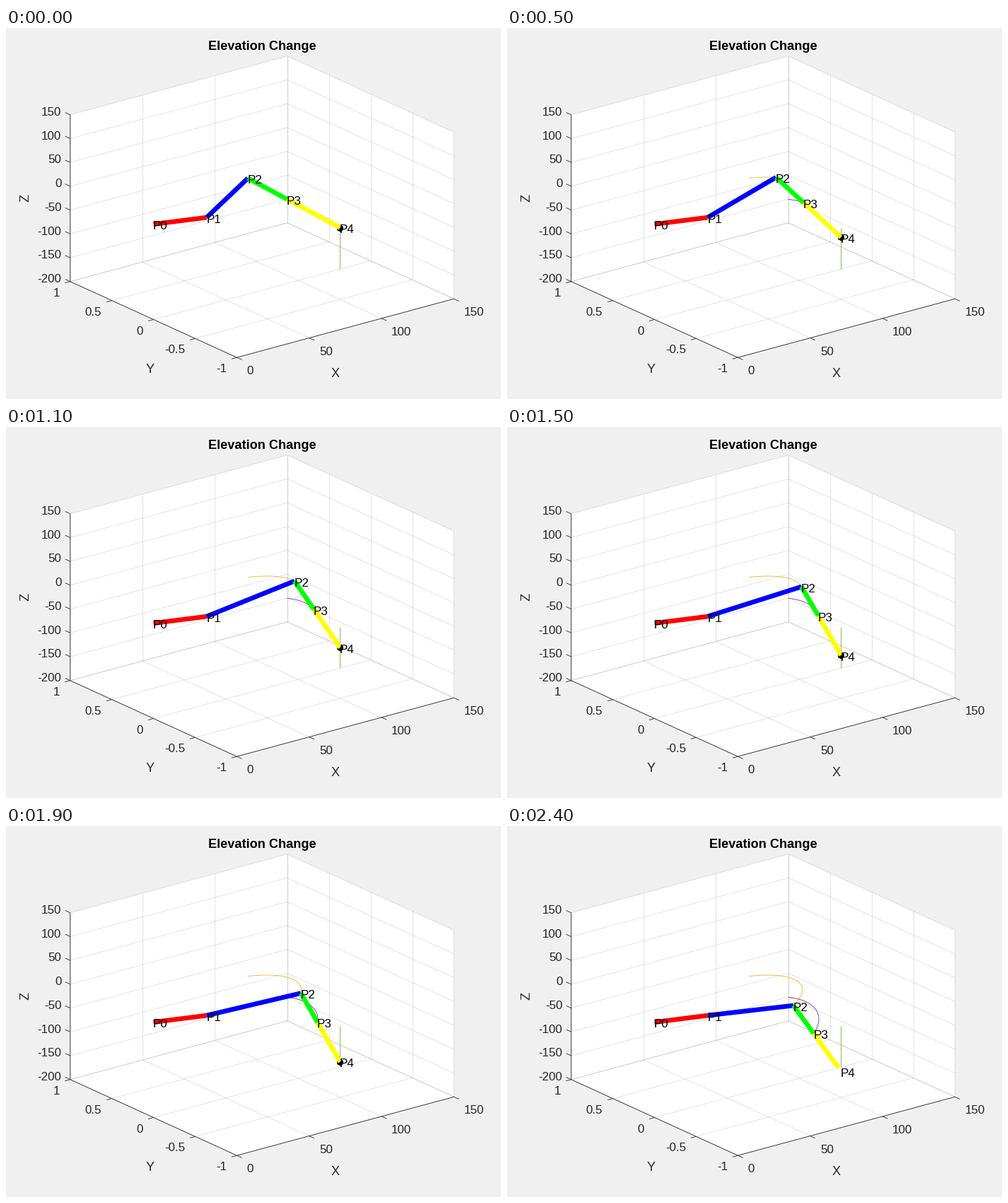
Recreate the animation shown at these times as a matplotlib script. Size 700 px wide and 525 px high, loop 2.5 s.

```python
import numpy as np
import matplotlib.pyplot as plt
from matplotlib.animation import FuncAnimation

W, H, DPI = 700, 525, 100
PX = 72 / DPI          # points per pixel
FRAMES, STEP_MS = 25, 100
INK = "#262626"
THIN = 0.83 * PX
BIG, SMALL = 18.2, 17  # text sizes in pixels

plt.rcParams["font.family"] = "Liberation Sans"
plt.rcParams["axes.unicode_minus"] = False

# Parallel projection of the 3D box, in pixels
ORIGIN = np.array([208.6, 277.65])
EX = np.array([307, -83]) / 150
EY = np.array([-235.7, -107.5]) / 2
EZ = np.array([0, -236 / 350])
FLOOR, TOP = -200, 150


def project(x, y, z):
    return ORIGIN + x * EX + y * EY + z * EZ


fig = plt.figure(figsize=(W / DPI, H / DPI), dpi=DPI, facecolor="#f0f0f0")
ax = fig.add_axes([0, 0, 1, 1])
ax.set_xlim(0, W)
ax.set_ylim(H, 0)
ax.axis("off")


def stroke(*points, color=INK, width=THIN, **kw):
    xs, ys = np.array(points).T
    return ax.plot(xs, ys, color=color, lw=width, solid_capstyle="butt", **kw)[0]


def label(x, y, text, size=SMALL, color=INK, **kw):
    return ax.text(x, y, text, fontsize=size * PX, color=color, va="baseline", **kw)


def grid(*points):
    stroke(*points, alpha=0.15, zorder=1)


def tick(p, direction):
    stroke(p, p + 7.8 * direction / np.hypot(*direction), zorder=2)


# Box faces
hull = [project(*c) for c in [(0, 1, TOP), (150, 1, TOP), (150, -1, TOP),
                              (150, -1, FLOOR), (0, -1, FLOOR), (0, 1, FLOOR)]]
ax.fill(*np.array(hull).T, color="white", lw=0, zorder=0)

# Grid, ticks and tick labels
for x in (0, 50, 100, 150):
    grid(project(x, -1, FLOOR), project(x, 1, FLOOR))
    grid(project(x, 1, FLOOR), project(x, 1, TOP))
    p = project(x, -1, FLOOR)
    tick(p, -EY)
    label(p[0] + 14, p[1] + 24.2, str(x))

for y in (-1, -0.5, 0, 0.5, 1):
    grid(project(0, y, FLOOR), project(150, y, FLOOR))
    grid(project(150, y, FLOOR), project(150, y, TOP))
    p = project(0, y, FLOOR)
    tick(p, -EX)
    label(p[0] - 14.4, p[1] + 21, f"{y:g}", ha="right")

for z in range(FLOOR, TOP + 1, 50):
    grid(project(0, 1, z), project(150, 1, z))
    grid(project(150, 1, z), project(150, -1, z))
    p = project(0, 1, z)
    tick(p, EY)
    label(p[0] - 12.3, p[1] + 1.3, str(z), ha="right")

stroke(project(0, 1, TOP), project(0, 1, FLOOR), project(0, -1, FLOOR),
       project(150, -1, FLOOR), zorder=2)

label(362.3, 31.3, "Elevation Change", BIG, "black", ha="center", weight="bold")
label(466, 494.3, "X", BIG, ha="center")
label(204, 488.3, "Y", BIG, ha="center")
label(32, 240, "Z", BIG, ha="center", rotation=90, rotation_mode="anchor")

# Arm geometry in the x-z plane
P1 = 40 * np.array([np.cos(np.radians(-23.5)), np.sin(np.radians(-23.5))])
UPPER, FORE, SPLIT = 65.5, 168.5, 0.425
REACH_X, START_Z, DROP = 128.9, -113, 4


def pose(k):
    """Joints P0..P4 while the tip descends at constant x."""
    tip = np.array([REACH_X, START_Z - DROP * k])
    d = tip - P1
    r = np.hypot(*d)
    bend = np.arccos((r**2 + UPPER**2 - FORE**2) / (2 * r * UPPER))
    a = np.arctan2(d[1], d[0]) + bend
    elbow = P1 + UPPER * np.array([np.cos(a), np.sin(a)])
    return np.array([(0, 0), P1, elbow, elbow + SPLIT * (tip - elbow), tip])


def to_px(p):
    return project(p[0], 0, p[1])


stroke(to_px((REACH_X, START_Z)), to_px((REACH_X, FLOOR)), color="#77ac30", zorder=3)
trails = [stroke((0, 0), color=c, zorder=3) for c in ("#edb120", "#7e2f8e")]
tip_mark = stroke((0, 0), color="black", marker="h", markersize=10 * PX,
                  markeredgewidth=0, zorder=4)
links = [stroke((0, 0), color=c, width=6.67 * PX, zorder=5)
         for c in ("#ff0000", "#0000ff", "#00ff00", "#ffff00")]
names = [label(0, 0, f"P{i}", color="black", zorder=6) for i in range(5)]

poses = [pose(k) for k in range(FRAMES)]
path = np.array([[to_px(p) for p in joints] for joints in poses])


def update(k):
    joints, pts = poses[k], path[k]
    for i, trail in enumerate(trails, start=2):
        trail.set_data(path[:k + 1, i, 0], path[:k + 1, i, 1])
    ends = pts.copy()
    below = joints[4, 1] < FLOOR
    if below:  # the box cuts the last link at the floor
        t = (FLOOR - joints[3, 1]) / (joints[4, 1] - joints[3, 1])
        ends[4] = pts[3] + t * (pts[4] - pts[3])
    for i, link in enumerate(links):
        link.set_data(ends[i:i + 2, 0], ends[i:i + 2, 1])
    tip_mark.set_data([pts[4, 0]], [pts[4, 1]])
    tip_mark.set_visible(not below)
    for name, (x, y) in zip(names, pts):
        name.set_position((x - 0.5, y + 7.6))
    return [*trails, tip_mark, *links, *names]


anim = FuncAnimation(fig, update, frames=FRAMES, interval=STEP_MS,
                     repeat=True, repeat_delay=0)
plt.show()
```
